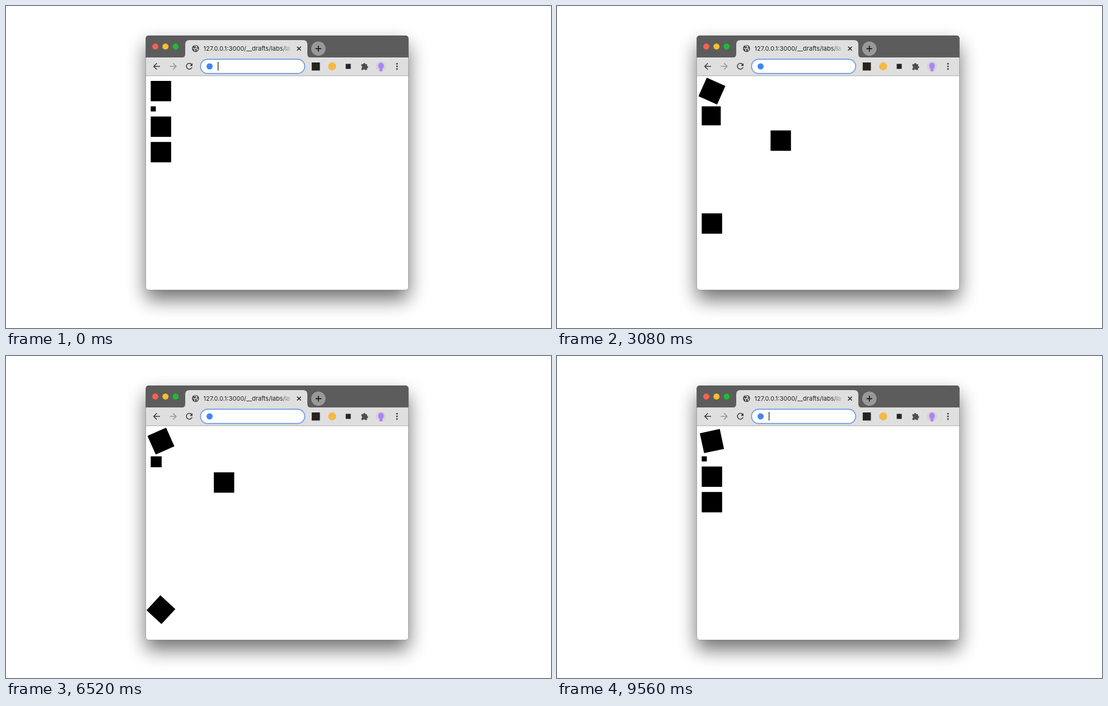
An HTML page that plays this animation: 973 by 576 pixels, repeating every 9600 ms.

```html
<!DOCTYPE html>
<html lang="en">
<head>
<meta charset="utf-8">
<title>Four moving boxes</title>
<style>
  html, body { margin: 0; width: 100%; height: 100%; overflow: hidden; background: #fff; }
  svg { display: block; width: 100vw; height: 100vh; }
  .tab { font: 400 11px Inter, Roboto, sans-serif; }
  .icon { fill: none; stroke: #3c3c3c; stroke-width: 1.5; }
</style>
</head>
<body>
<svg viewBox="0 0 973 576" xmlns="http://www.w3.org/2000/svg">
  <defs>
    <filter id="blur" x="-30%" y="-30%" width="160%" height="160%">
      <feGaussianBlur stdDeviation="17"/>
    </filter>
    <clipPath id="window"><rect x="249.5" y="53" width="469" height="455" rx="5"/></clipPath>
    <linearGradient id="fade" gradientUnits="userSpaceOnUse" x1="490" x2="511" y1="0" y2="0">
      <stop offset="0" stop-color="#1f1f1f"/>
      <stop offset="1" stop-color="#1f1f1f" stop-opacity="0"/>
    </linearGradient>
  </defs>

  <rect width="973" height="576" fill="#fff"/>
  <rect x="249.5" y="70" width="469" height="455" rx="5" opacity=".56" filter="url(#blur)"/>

  <g clip-path="url(#window)">
    <rect x="249" y="53" width="470" height="456" fill="#fff"/>
    <rect x="249" y="53" width="470" height="40" fill="#5c5c5c"/>
    <rect x="249" y="92" width="470" height="33" fill="#dfdfdf"/>
    <rect x="249" y="124.3" width="470" height="1" fill="#a9a9a9"/>
    <path d="M313 92.5q7 0 7-7v-17q0-7.500 7.500-7.500h203q7.500 0 7.500 7.500v17q0 7 7 7z" fill="#dfdfdf"/>
  </g>
  <rect x="249.500" y="53" width="469" height="455" rx="5" fill="none" stroke="#000" stroke-opacity=".32" stroke-width=".8"/>

  <circle cx="266.500" cy="72.500" r="5.400" fill="#fd6152"/>
  <circle cx="284.700" cy="72.500" r="5.400" fill="#fdbd2e"/>
  <circle cx="302.800" cy="72.500" r="5.400" fill="#1fb934"/>

  <circle cx="338.300" cy="76" r="6.300" fill="#454749"/>
  <path d="M333.500 75l3.500 2.500v3.500M336 71.500h3l2 2-3 2 4 1.500-1 3" fill="none" stroke="#dfdfdf" stroke-width="1.500"/>
  <text class="tab" x="352.500" y="80" fill="url(#fade)">127.0.0.1:3000/__drafts/labs/la</text>
  <path d="M519.700 72.700l6.800 6.800m0-6.800l-6.800 6.800" class="icon" style="stroke:#1f1f1f;stroke-width:1.600"/>
  <circle cx="557.700" cy="76.300" r="12.800" fill="#999"/>
  <path d="M552.500 76.300h10.400M557.700 71.100v10.400" class="icon" style="stroke:#161616;stroke-width:1.700"/>

  <path d="M275 108h-11M269.300 102.400l-5.600 5.600 5.600 5.600" class="icon"/>
  <path d="M292.500 108h11M298.200 102.400l5.600 5.600-5.600 5.600" class="icon" style="stroke:#969696"/>
  <path d="M331.700 105A5.200 5.200 0 1 0 332.200 109.500" class="icon"/>
  <path d="M333 102.200v5h-5z" fill="#3c3c3c"/>

  <rect x="347.300" y="95.200" width="186" height="25.600" rx="12.800" fill="#fff" stroke="#75a1e5" stroke-width="1.900"/>
  <circle cx="363.500" cy="108" r="5.500" fill="#4285f4"/>
  <rect id="caret" x="377.900" y="100" width="1.400" height="15.500" fill="#333"/>

  <rect x="545.800" y="101" width="14.600" height="14.400" fill="#25221f"/>
  <circle cx="582.300" cy="108" r="7.200" fill="#f5b945"/>
  <rect x="606.500" y="103.500" width="9" height="9" fill="#252525"/>
  <path d="M634.500 104h3a2 2 0 1 1 4 0h3v3.200a2 2 0 1 1 0 4v3.300h-3.300a2 2 0 0 0-3.700 0h-3v-3.200a2 2 0 0 0 0-3.800z" fill="#4c4f52"/>
  <circle cx="669.300" cy="108" r="9.200" fill="#d5d3d9"/>
  <path d="M664.500 107q0-5.500 5-5.500t5 5.500q0 4-2.500 5.500v4q-2.500 1.500-5 0v-4q-2.500-1.500-2.500-5.500z" fill="#ae84f2"/>
  <g fill="#3c3c3c">
    <circle cx="698" cy="103.300" r="1.500"/><circle cx="698" cy="108" r="1.500"/><circle cx="698" cy="112.700" r="1.500"/>
  </g>

  <g id="boxes">
    <rect/><rect/><rect/><rect/>
  </g>
</svg>
<script>
  const LOOP = 9600, CYCLE = 4800, STEP = 40;
  const UNIT = 0.91, SIDE = 40 * UNIT, GAP = 10 * UNIT;
  const LEFT = 258.4, TOP = 134;
  const boxes = document.querySelectorAll('#boxes rect');
  const caret = document.getElementById('caret');

  // Cubic Bézier (.25, .1, .25, 1), solved by bisection
  function ease(x) {
    if (x <= 0) return 0;
    if (x >= 1) return 1;
    let lo = 0, hi = 1;
    for (let i = 0; i < 24; i++) {
      const m = (lo + hi) / 2;
      if (0.75 * m * (1 - m) + m ** 3 < x) lo = m; else hi = m;
    }
    const s = lo, r = 1 - s;
    return 0.3 * s * r * r + 3 * s * s * r + s ** 3;
  }

  // Eased value along [time, value] keys
  function track(keys, t) {
    for (let i = 1; i < keys.length; i++) {
      const [t0, a] = keys[i - 1], [t1, b] = keys[i];
      if (t <= t1) return a + (b - a) * ease((t - t0) / (t1 - t0));
    }
    return keys[keys.length - 1][1];
  }

  const slide = [[0, 0], [995, 200], [1488, 200], [2464, 0], [3452, 150], [4628, 0], [CYCLE, 0]];
  const drop = [[0, 0], [1486, 200], [2464, 200], [4815, 0]];
  const spin = [[0, 0], [1488, 0], [2464, -360], [CYCLE, -360]];
  const grow = [[0, 10], [CYCLE, 40], [LOOP, 10]];

  function place(box, x, y, size, angle = 0) {
    box.setAttribute('x', x);
    box.setAttribute('y', y);
    box.setAttribute('width', size);
    box.setAttribute('height', size);
    box.setAttribute('transform', `rotate(${angle} ${x + size / 2} ${y + size / 2})`);
  }

  function draw(t) {
    const c = t % CYCLE;
    const size = track(grow, t) * UNIT;
    const y2 = TOP + SIDE + GAP;
    const y3 = y2 + size + GAP;
    const y4 = y3 + SIDE + GAP;
    place(boxes[0], LEFT, TOP, SIDE, (t % 1200) * 0.3);
    place(boxes[1], LEFT, y2, size);
    place(boxes[2], LEFT + track(slide, c) * UNIT, y3, SIDE);
    place(boxes[3], LEFT, y4 + track(drop, c) * UNIT, SIDE, track(spin, c));
    const blink = t % 1200;
    caret.setAttribute('opacity', blink < 160 || blink >= 760 ? 1 : 0);
  }

  const start = performance.now();
  function tick() {
    const t = (performance.now() - start) % LOOP;
    draw(Math.floor(t / STEP) * STEP);
    requestAnimationFrame(tick);
  }
  draw(0);
  requestAnimationFrame(tick);
</script>
</body>
</html>
```
